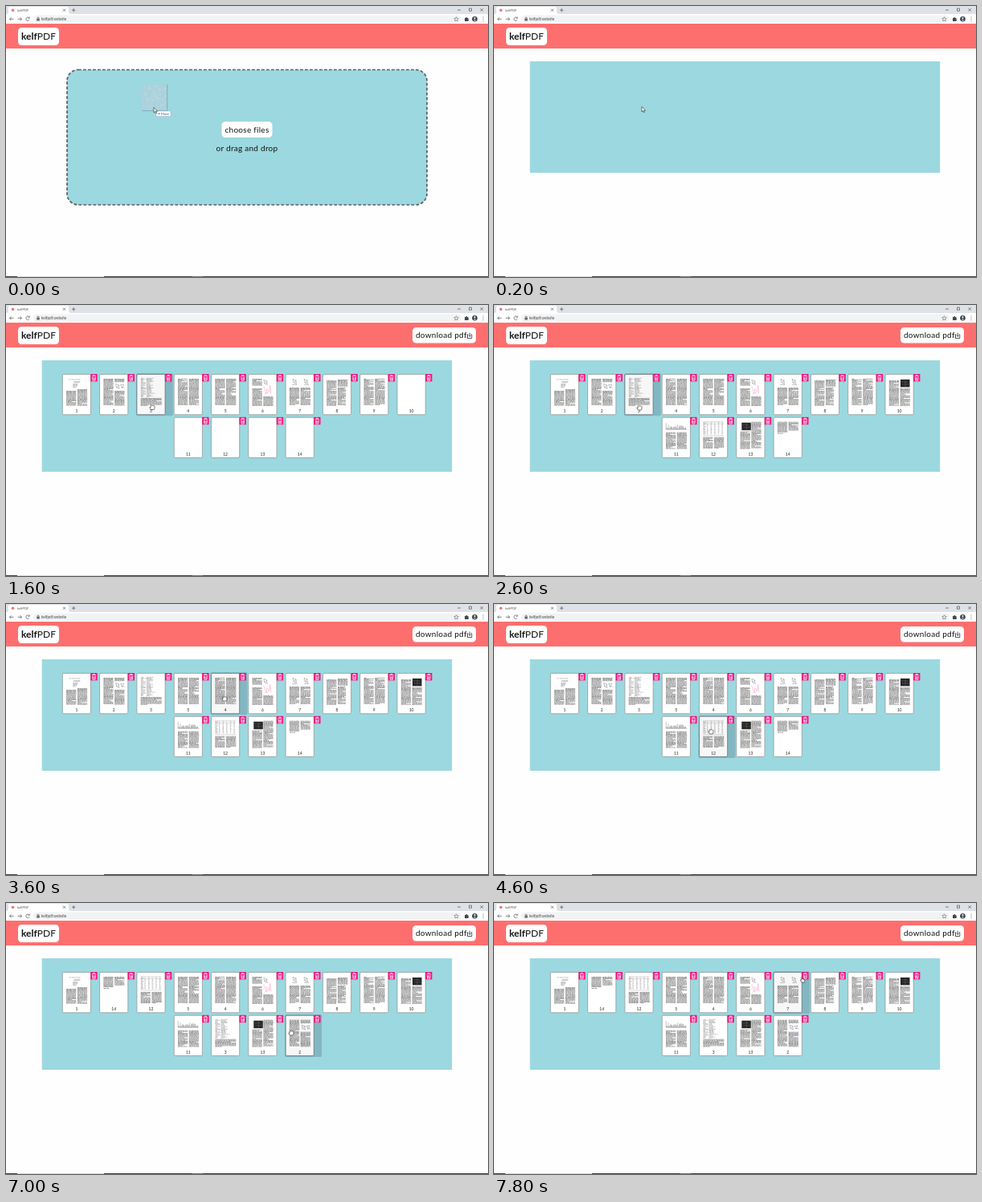
An HTML page that plays this animation: 600x338 px, repeating every 8000 ms.

```html
<!DOCTYPE html>
<html lang="en">
<head>
<meta charset="utf-8">
<title>kelfPDF</title>
<style>
  html, body { margin: 0; width: 100%; height: 100%; overflow: hidden; background: #fefefe; }
  svg { display: block; width: 100%; height: 100%; font-family: Lato, "Open Sans", sans-serif; }
  .line { fill: none; stroke: #5f6368; stroke-width: .8; }
  .label { font-size: 10px; letter-spacing: .27px; fill: #111; }
  .copy { fill: none; stroke: #727272; stroke-width: .72; }
  .fig { fill: none; stroke: #666; stroke-width: .4; }
  .sheet { fill: #fff; stroke: #8f9496; stroke-width: .75; }
  .glow, .shade { display: none; }
  .hot .glow, .hot .shade { display: inline; }
  .hot .sheet { stroke: #5d6d73; }
  .hand { fill: #fff; stroke: #222; stroke-width: .6; stroke-linejoin: round; }
</style>
</head>
<body>
<svg viewBox="0 0 600 338" preserveAspectRatio="none">
  <rect width="600" height="338" fill="#fefefe"/>

  <g id="browser">
    <rect width="600" height="10" fill="#dee1e6"/>
    <path d="M1 10Q3 10 3 8V3Q3 1 5 1H75.500Q78 1 78 3V8Q78 10 80 10Z" fill="#fff"/>
    <circle cx="8.500" cy="5.200" r="1.800" fill="#ee7474"/>
    <text x="14" y="6.700" font-size="4.100" fill="#555">kelfPDF</text>
    <path class="line" d="M71 3.700l3 3m0-3l-3 3M82 5.200h4.400m-2.200-2.200v4.400"/>
    <path class="line" d="M562 5h4M576.500 3h3v3.200h-3zM590.500 3.200l3.400 3.400m0-3.400l-3.400 3.400"/>
    <rect y="10" width="600" height="12" fill="#fff"/>
    <rect x="34" y="11.600" width="533" height="9.400" rx="4.700" fill="#f1f3f4"/>
    <path class="line" d="M9.500 16.300h-5m2-2l-2 2 2 2M28.900 15a2.200 2.200 0 1 0 .1 2.300M29.200 13.600v1.700h-1.700"/>
    <path class="line" d="M14.500 16.300h5m-2-2l2 2-2 2"/>
    <path class="line" d="M39 16v-.9a1 1 0 0 1 2 0v.9"/>
    <rect x="38.300" y="15.800" width="3.400" height="2.700" fill="#5f6368"/>
    <text x="44" y="17.900" font-size="4.700" fill="#444">kelfpdf.website</text>
    <path d="M560.500 13.600l.8 1.800 2 .2-1.500 1.300.4 2-1.700-1-1.700 1 .4-2-1.500-1.300 2-.2z" fill="none" stroke="#666" stroke-width=".6"/>
    <path d="M571 15h1.300a1 1 0 0 1 2 0h1.200v1.500a1 1 0 0 1 0 1.800v.7h-4.500z" fill="#45484c"/>
    <circle cx="583.500" cy="16.200" r="3.300" fill="#34404c"/>
    <path d="M583.500 14.100a1 1 0 0 1 0 2.100a1 1 0 0 1 0-2.100M581.500 18.200q2-2 4 0z" fill="#fff"/>
    <path d="M594 14v0m0 2.300v0m0 2.300v0" stroke="#555" stroke-width="1" stroke-linecap="round"/>
  </g>

  <rect y="22" width="600" height="31" fill="#fd6f6f"/>
  <rect x="15" y="27" width="51" height="22" rx="4.500" fill="#fff"/>
  <text x="19" y="42.200" font-size="12" fill="#111"><tspan font-weight="700">kelf</tspan>PDF</text>

  <g id="upload">
    <rect x="76" y="79.500" width="448" height="168.500" rx="14" fill="#9cd8df" stroke="#5a6062" stroke-width="1.700" stroke-dasharray="3.800 2.200"/>
    <rect x="268.500" y="144.300" width="63" height="19.700" rx="4.500" fill="#fff"/>
    <g class="label" text-anchor="middle">
      <text x="300" y="157.600">choose files</text>
      <text x="300" y="181">or drag and drop</text>
    </g>
    <rect x="169" y="98" width="31.500" height="32.500" fill="#abd2dc"/>
    <path id="speckle" fill="none" stroke="#c4dce9" stroke-width=".8"/>
    <path d="M169 130.700H200.700V98" fill="none" stroke="#7ba9bd" stroke-width=".9"/>
    <rect x="187" y="131" width="18" height="6.700" fill="#fff" stroke="#9aa8b4" stroke-width=".5"/>
    <path d="M188.500 134.400h3m-1.200-1.200l1.200 1.200-1.200 1.200" fill="none" stroke="#2b62b5" stroke-width=".6"/>
    <text x="193" y="136" font-size="4" fill="#2b4f9e">Move</text>
  </g>

  <rect id="panel" x="44.700" y="69" width="510.500" height="139" fill="#9cd8df"/>
  <g id="pages"></g>
  <g id="download">
    <rect x="506" y="28" width="79" height="19.600" rx="4.500" fill="#fff"/>
    <text class="label" x="510" y="41.300">download pdf</text>
    <path d="M575.500 36.700h-1v4.800h5.300v-4.800h-1M577.200 34.600v4.700m-1.500-1.500l1.500 1.500 1.500-1.500" fill="none" stroke="#222" stroke-width=".75"/>
  </g>

  <use id="ghost" opacity=".6"/>
  <path id="arrow" class="hand" d="M0-2.500v6.500l1.500-1.400 1 2.300 1-.5-1-2.100h2z"/>
  <path id="grab" class="hand" d="M-1.600 3L-3.200.4q.2-1 1.300 0V-2q.6-.9 1.200 0 .6-1.200 1.300 0 .8-.8 1.300.3.900-.3 1.100.6V1q-.2 1.200-.8 2z"/>
  <path id="point" class="hand" d="M-1 4L-2.700 1.200q.3-.9 1.300 0V-2.300q.6-.9 1.200 0V0q1.500-.3 3 .8V2.300l-.7 1.700z"/>

  <g id="taskbar">
    <rect y="337" width="600" height="1" fill="#444"/>
    <rect x="14" y="337" width="108" height="1" fill="#dcdcdc"/>
    <rect x="232" y="337" width="13" height="1" fill="#777"/>
  </g>
</svg>

<script>
const LOOP = 8000, STEP = 200, COUNT = 14;
const $ = id => document.getElementById(id);
const show = (id, on) => { $(id).style.display = on ? '' : 'none'; };
const place = (el, x, y) => el.setAttribute('transform', `translate(${x} ${y})`);

let seed = 7;
const rand = () => (seed = seed * 16807 % 2147483647) / 2147483647;

// A block of body text: lines of random words, some ending early.
function copy(x, y, w, h, ragged = .14) {
  let d = '';
  for (let v = 0; v < h; v += 1.1) {
    const end = rand() < ragged ? w * (.3 + rand() * .5) : w;
    for (let u = 0; u < end;) {
      const word = Math.min(.8 + rand() * 2.6, end - u);
      d += `M${(x + u).toFixed(1)} ${(y + v).toFixed(1)}h${word.toFixed(1)}`;
      u += word + .4;
    }
  }
  return `<path class="copy" d="${d}"/>`;
}
const L = 4.8, R = 18.6, W = 12.2;
const left = (y = 6, h = 33) => copy(L, y, W, h);
const right = (y = 6, h = 33) => copy(R, y, W, h);
const both = (y, h) => left(y, h) + right(y, h);
const faint = shapes => `<g opacity=".6">${shapes}</g>`;
const fig = (d, color = '#666') => `<path class="fig" d="${d}" style="stroke:${color}"/>`;
const photo = (x, y) => `<rect x="${x}" y="${y}" width="11.500" height="9.500" fill="#262626"/>`
  + fig(`M${x + 1} ${y + 3}h8m-7 3h9m-5-5v8`, '#777');
const net = (x, y) => fig(`M${x} ${y}l4 1.500-3 3 4 1.500M${x + 4} ${y + 1.5}v4M${x} ${y}l1 4.500`);

function chart() {
  let d = 'M5 15h26M5 7v8';
  for (let x = 6; x < 30; x += .9) d += `M${x.toFixed(1)} 15v${(-1 - rand() * 5).toFixed(1)}`;
  return fig(d);
}
function table() {
  let s = fig('M4.500 5.500h26M4.500 8h26M4.500 22.500h26');
  for (let x = 5; x < 30; x += 4.6) s += copy(x, 6.5, x < 9 ? 3.2 : 1.6, 15, .5);
  return faint(s);
}

const art = [
  () => faint(copy(8, 6.5, 19, 1) + copy(14, 9, 8, 2) + copy(13, 12, 10, 5, .8)) + left(21, 18) + right(19, 20),
  () => left(6, 33) + right(6, 4) + net(20, 12) + fig('M26 13h4l-2 4zM27 16l4 1', '#556a96') + right(21, 18),
  () => faint(copy(5, 5, 6, 24, .7) + copy(12, 5, 11, 24, .9)) + copy(L, 30, 26, 9),
  () => both(6, 33),
  () => both(6, 33),
  () => left(6, 8) + left(18, 21) + net(19, 7) + fig('M19 15l3 9 1-6 3 4 1-8 1 10M20 25l6-3', '#f07fb4') + right(28, 11),
  () => net(9, 6) + net(23, 6) + fig('M8 13h6m9 0h6') + both(17, 22),
  () => left(8, 31) + right(7, 8) + copy(R, 17, 10, 21, .35),
  () => both(6, 33),
  () => left(8, 31) + photo(19, 6.5) + right(18, 21),
  () => chart() + both(19, 20),
  () => table() + both(25, 14),
  () => photo(6.5, 6.5) + left(18, 21) + right(6, 33),
  () => left(6, 13) + right(6, 10) + copy(L, 20, 7, 1)
];

const slot = i => i < 10
  ? { x: 70.3 + 46.3 * i, y: 86.4 }
  : { x: 209.2 + 46.3 * (i - 10), y: 140.2 };

const bin = `<rect x="35" y="-.4" width="8.400" height="9.400" fill="#f0147f"/>
  <path d="M36.600 2.200h5.200M38.100 2v-1h2.200v1M37.200 3.300l.4 4.600h3.200l.4-4.600M38.500 3.800v3.300m1.400-3.300v3.300" fill="none" stroke="#fff" stroke-width=".7"/>`;

$('pages').innerHTML = art.map((draw, i) => `<g id="cell${i}">
  <rect class="glow" x="-1" y="-1.200" width="46" height="53" rx="1.500" fill="#82b7c2"/>
  <g id="page${i}"><rect class="sheet" width="35.200" height="50.400" rx="1.600"/>
    <g id="art${i}">${draw()}</g>
    <text x="17.600" y="47.500" font-size="5" text-anchor="middle" fill="#222">${i + 1}</text></g>
  <rect class="shade" width="35.200" height="50.400" rx="1.600" fill="#345" opacity=".04"/>${bin}</g>`).join('');

let dots = '';
for (let i = 0; i < 90; i++) dots += `M${(170 + rand() * 28).toFixed(1)} ${(99 + rand() * 30).toFixed(1)}h1.4`;
$('speckle').setAttribute('d', dots);

// time, x, y
const path = [
  [0, 184, 129], [200, 184, 128], [800, 183, 127], [2400, 181, 128], [2600, 181, 128],
  [2900, 226, 117], [3000, 226, 117], [3400, 272, 116], [3600, 272, 118],
  [4400, 270, 159], [4700, 270, 159], [5200, 180, 106], [5400, 180, 106],
  [5800, 123, 105], [6100, 123, 105], [6700, 355, 161], [7000, 355, 162],
  [7200, 355, 160], [7700, 384, 95], [8000, 384, 95]
];
const drags = [
  { start: 3000, end: 3400, from: 3, to: 4 },
  { start: 4700, end: 5300, from: 11, to: 2 },
  { start: 6100, end: 6800, from: 1, to: 13 }
];
const loaded = i => 900 + i * 78;

function cursorAt(t) {
  const k = path.findIndex(p => p[0] > t);
  const [t0, x0, y0] = path[k - 1], [t1, x1, y1] = path[k];
  const u = (t - t0) / (t1 - t0), e = u * u * (3 - 2 * u);
  return { x: x0 + (x1 - x0) * e, y: y0 + (y1 - y0) * e };
}
function slotAt({ x, y }) {
  for (let i = 0; i < COUNT; i++) {
    const s = slot(i);
    if (x >= s.x - 1 && x < s.x + 45 && y >= s.y - 1.2 && y < s.y + 51.8) return i;
  }
  return -1;
}

function render(t) {
  const open = t >= 200, ready = t >= 600;
  show('upload', !open);
  show('panel', open);
  show('pages', ready);
  show('download', ready);

  const order = art.map((_, i) => i);
  for (const { end, from, to } of drags)
    if (t >= end) [order[from], order[to]] = [order[to], order[from]];

  const pos = cursorAt(t);
  const drag = drags.find(d => t >= d.start && t < d.end);
  const hover = drag ? drag.from : slotAt(pos);

  order.forEach((page, i) => {
    const s = slot(i), cell = $('cell' + page);
    place(cell, s.x, s.y);
    cell.setAttribute('class', i === hover ? 'hot' : '');
    show('art' + page, t >= loaded(page));
  });

  show('ghost', drag);
  if (drag) {
    const s = slot(drag.from), grip = cursorAt(drag.start);
    $('ghost').setAttribute('href', '#page' + order[drag.from]);
    place($('ghost'), s.x + pos.x - grip.x, s.y + pos.y - grip.y);
  }

  const s = hover < 0 ? null : slot(hover);
  const onBin = s && pos.x > s.x + 35 && pos.y < s.y + 9;
  const kind = !ready || drag || !s ? 'arrow' : onBin ? 'point' : 'grab';
  for (const id of ['arrow', 'grab', 'point']) show(id, id === kind);
  place($(kind), pos.x, pos.y);
}

let last = -1;
const begin = performance.now();
function tick() {
  const t = Math.floor((performance.now() - begin) % LOOP / STEP) * STEP;
  if (t !== last) render(last = t);
  requestAnimationFrame(tick);
}
tick();
</script>
</body>
</html>
```
